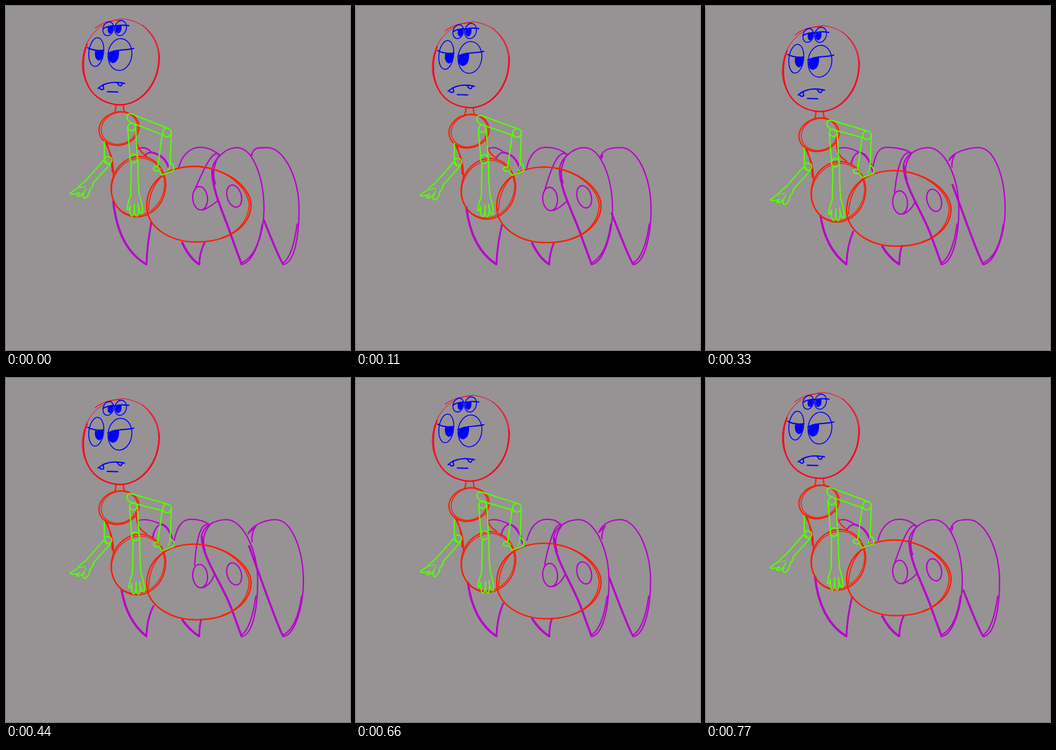
An HTML page that plays this animation: 560x560 px, repeating every 0.88 s.

```html
<!DOCTYPE html>
<html lang="en">
<head>
<meta charset="utf-8">
<title>Spider idle</title>
<style>
  html, body { margin: 0; width: 100%; height: 100%; overflow: hidden; background: #979294; }
  svg { display: block; width: 100vw; height: 100vh; fill: none; stroke-width: 2.1; stroke-linecap: round; stroke-linejoin: round; }
  .head { stroke: #ff0022; }
  .body { stroke: #ff1c00; }
  .limb { stroke: #b900cc; }
  .arm { stroke: #55ff00; }
  .face { stroke: #0000ff; stroke-width: 1.5; }
  .ink { fill: #0000ff; stroke: none; }
</style>
</head>
<body>
<svg id="stage" viewBox="0 0 560 560"></svg>
<script>
const STEP = 110, STEPS = 8, SINK = 5, STRIDE = 3;

const smooth = u => u * u * (3 - 2 * u);

// Goes from 0 to 1 until the peak step and back to 0 at the end of the loop.
const cycle = (i, peak, rise, fall) =>
  i < peak ? rise(i / peak) : fall((STEPS - i) / (STEPS - peak));

const firm = i => cycle(i, SINK, u => u * (2 - u), u => u ** 1.5);
const soft = i => cycle(i, SINK, smooth, smooth);
const follow = i => cycle(i, SINK, u => Math.sin(u * Math.PI / 2) ** 1.3, smooth);
const sway = i => cycle(i, STRIDE, u => u, u => u ** 1.5);

const path = (d, extra = '') => `<path d="${d}" ${extra}/>`;
const twin = (d, dx, dy) => path(d) + path(d, `stroke-width="1.6" transform="translate(${dx} ${dy})"`);
const oval = (x, y, rx, ry, turn = 0, extra = '') =>
  `<ellipse cx="${x}" cy="${y}" rx="${rx}" ry="${ry}" transform="rotate(${turn} ${x} ${y})" ${extra}/>`;
const group = (name, dy, content, dx = 0) =>
  `<g class="${name}" transform="translate(${dx} ${dy})">${content}</g>`;

const head =
  path('M190 21C225 24 250 50 250 85C249 125 225 159 187 161C150 160 124 130 124 95C125 55 150 24 190 21', 'stroke-width="1"') +
  path('M132 62C118 97 125 157 185 161C221 161 251 124 249 78', 'stroke-width="2.3"') +
  path('M145 36Q163 22 188 23M222 31Q253 58 248 96', 'stroke-width="1.1"');

const face =
  oval(147, 75, 12, 23.5, 7) + oval(185.5, 79, 19.3, 26, 7) +
  oval(166.5, 37, 8.5, 11.5, 17) + oval(186.5, 36, 9.5, 12.5, 15) +
  path('M133 68Q145 74 159 72M166 77C178 70 193 73 208 69M158 37Q165 33 175 32M176 33Q187 30 200 32', 'stroke-width="2"') +
  path('M150 134C160 125 175 122 193 126M152 133Q155 138 159 135L158 128M181 125Q185 132 188 129L190 125', 'stroke-width="2"') +
  path('M165 139.5L182 140', 'stroke-width="2"') +
  path('M145 73Q153 74 158 72Q159 88 151 89Q143 86 145 73M168 76Q175 71 184 72Q185 91 174 93Q164 91 168 76', 'class="ink"') +
  path('M166 34L174 32Q175 44 169 45Q164 43 166 34M179 33L188 32Q189 44 182 45Q176 42 179 33', 'class="ink"');

const chest =
  oval(184, 199.5, 33, 27, -14) + oval(184.5, 199, 30, 25.5, -20, 'stroke-width="1.4"') +
  path('M179 161Q179 168 177 173M191 161Q191 168 193 173') +
  path('M184 160V165', 'stroke="#ff7a00" stroke-width="1.5"');

const hip = oval(215.5, 294, 44, 49.5, 14) + oval(215, 294.5, 42, 47.5, 24, 'stroke-width="1.3"');

const abdomen =
  path('M229 325C230 285 262 262 305 261C350 261 398 290 399 324C398 360 360 383 315 384C270 386 229 362 229 325', 'stroke-width="2.3"') +
  path('M232 332C233 296 250 275 270 267M325 263C365 270 394 298 396 324C394 352 375 370 352 377', 'stroke-width="1.7"');

const spots = oval(316, 313, 12, 19, -5) + oval(371.5, 309.5, 11.5, 18.5, -16);

const sideArm =
  path('M160 221V250L130 284M170 257L142 288M160 249Q163 257 170 257') + oval(166, 251, 6, 6) +
  path('M130 284Q121 291 117 296L104 305Q109 308 120 304L115 309Q121 311 127 303Q123 311 128 313Q135 311 137 298Q143 293 142 287') +
  path('M117 296L129 294M127 303L130 297', 'stroke-width="1.5"');

const farHand =
  path('M247 262Q240 259 240 265Q243 271 249 267L254 275L273 268Q275 260 268 255') +
  path('M247 262L252 266M267 258L264 267', 'stroke-width="1.5"');

const frontHand =
  path('M203 308Q199 318 197 330Q199 336 202 325Q201 341 205 342Q209 341 209 323Q208 342 213 342Q217 339 215 322Q217 339 222 338Q224 330 217 308');

function farArm(shoulder, elbow) {
  const top = 175 + shoulder, mid = 206 + elbow, low = 262 + elbow;
  return path(`M204 ${top + 15}C195 ${top + 11} 194 ${top} 203 ${top}L263 ${mid - 7}M204 ${top + 15}L256 ${mid + 4}`) +
    oval(262, mid, 7, 7) +
    path(`M254 ${mid + 4}L247 ${low}M269 ${mid + 2}L267 ${low - 4}`) +
    group('arm', elbow, farHand);
}

function frontArm(upper, lower, swing) {
  const top = 197 + upper, mid = 248 + lower, wrist = 308 + lower;
  return path(`M${198 + swing} ${top}L${202 + swing} ${mid}M${211 + swing} ${top}L${214 + swing} ${mid}`) +
    oval(204.5 + swing, top, 6, 6) + oval(208 + swing, mid, 6.5, 7) +
    path(`M${204 + swing} ${mid + 6}L${203 + swing} ${wrist}M${215 + swing} ${mid + 4}Q${214 + swing} ${mid + 30} ${217 + swing} ${wrist}`) +
    group('arm', lower, frontHand, swing);
}

const waist = (c, h) =>
  path(`M161 ${220 + c}C170 ${238 + c} 175 ${250 + h} 175 ${277 + h}M164 ${222 + c}Q172 ${245 + h} 173 ${270 + h}`) +
  path(`M212 ${208 + c}C212 ${228 + c} 218 ${238 + h} 229 ${244 + h}`);

// Crest of a large leg, its outer bulge and foot tip.
const outer = (peak, out, foot) =>
  `${peak} 230.5C${peak + 27} 230 ${out} 279 ${out} 331C${out} 371 ${foot + 20} 418 ${foot} 421` +
  `M${out - 3} 355Q${out - 10} 406 ${foot + 1} 418`;

function legs(i, sink) {
  const f = firm(i), k = follow(i), s = sway(i);

  const crest = 238 + 18 * k, bendX = 226 + 14 * k, endX = 265 + 9 * k;
  const back = twin(`M${174 + 14 * f} ${318 + 28 * f}Q${182 + 14 * f} 395 228 421`, 1.5, -1) +
    twin(`M229 421Q230 390 ${237 + 4 * k} ${352 + 20 * k}`, -1, 0) +
    path(`M214 233Q226 226 ${crest} 239`) +
    twin(`M${bendX} ${243 + 18 * k}Q${bendX + 4} 238 ${crest} 238Q${endX - 6} 243 ${endX} ${262 + 9 * k}`, -1, 1);

  const jointX = 347 - 16 * k, jointY = 242 - 3 * k, kneeX = 335 - 18 * k, kneeY = 268 - 10 * k;
  const midX = 281 - 10 * s, midPeak = 316 - 21 * s, innerX = 340 - 22 * f, belly = 385 + sink * 0.9;
  const middle = path(`M${midX} 264C${midX + 5} 242 ${midPeak - 15} 230 ${midPeak} 230C${midPeak + 14} 230 ${jointX - 8} ${jointY - 6} ${jointX} ${jointY}`) +
    path(`M${jointX} ${jointY}C${innerX - 4} 232 ${(innerX + 300) / 2} 270 307 ${300 + sink / 2}`) +
    path(`M${jointX} ${jointY}Q${kneeX - 2} ${kneeY} ${kneeX + 6} ${kneeY + 22}`) +
    path(`M321 ${332 + sink}Q333 ${327 + sink} ${346 - 8 * k} ${316 + sink * 0.6}`) +
    twin(`M286 ${belly}Q298 411 314 421`, 1.5, -1) +
    twin(`M315 421Q315 403 ${324 - 6 * k} ${belly - 1}`, -1, 0);

  const nearPeak = 375 - 18 * k;
  const near = twin(`M383 421L368 380C355 340 ${kneeX} ${kneeY + 35} ${kneeX} ${kneeY}`, 1.5, -0.5) +
    path(`M${kneeX} ${kneeY}C${kneeX + 2} ${kneeY - 18} ${nearPeak - 18} 231 ${outer(nearPeak, 420 - 11 * k, 383)}`);

  const farX = 399 - 5 * k, farY = 243 + 11 * k, farPeak = 425 + 18 * s;
  const far = path(`M${farX} ${farY}C${farX + 6} ${farY - 14} ${farPeak - 16} 231 ${outer(farPeak, 477 + 10 * s, 451)}`) +
    twin(`M451 421Q444 411 ${419 - 26 * f * f} ${348 - 81 * f * f}`, 1.5, 0) +
    path(`M${farX} ${farY}L${farX + 14 * k} ${farY - 14 * k}Q${farX + 4} ${farY} ${farX + 7 * k} ${farY + 14 * k}`);

  return back + middle + near + far;
}

function scene(i) {
  const headDrop = 13 * firm(i), chestDrop = 12 * firm(i), hipDrop = 10 * firm(i);
  const sink = 10.5 * soft(i), arm = 14 * follow(i);
  return group('limb', 0, legs(i, sink)) +
    group('limb', sink, spots) +
    group('body', sink, abdomen) +
    group('body', hipDrop, hip) +
    group('body', 0, waist(chestDrop, hipDrop)) +
    group('body', chestDrop, chest) +
    group('head', headDrop, head) +
    group('face', headDrop, face) +
    group('arm', arm, sideArm) +
    group('arm', 0, farArm(arm, 7 * soft(i)) + frontArm(12.5 * follow(i), 11 * soft(i), 3 * firm(i)));
}

const stage = document.getElementById('stage');
const start = performance.now();
let shown = -1;

function tick() {
  const i = Math.floor((performance.now() - start) / STEP) % STEPS;
  if (i !== shown) stage.innerHTML = scene(shown = i);
  requestAnimationFrame(tick);
}
tick();
</script>
</body>
</html>
```
